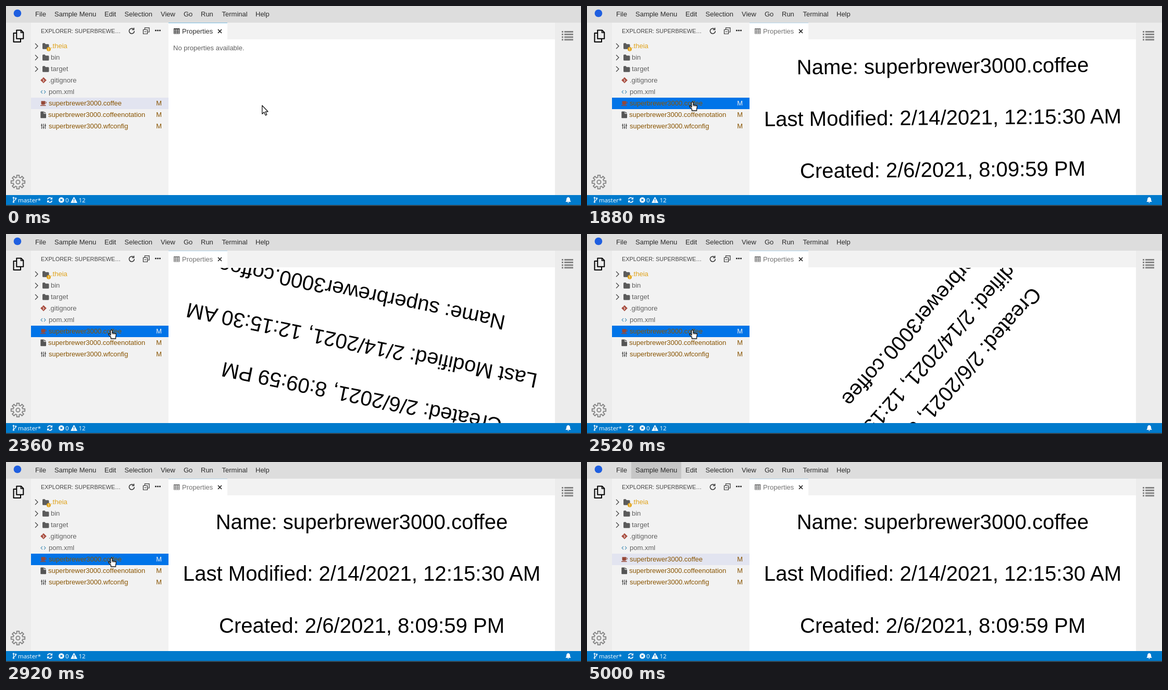
Write an HTML page that moves like this. It is 1104 px wide and 384 px high and loops after 5040 ms.

```html
<!DOCTYPE html>
<html lang="en">
<head>
<meta charset="utf-8">
<title>Property view</title>
<style>
  html, body { margin: 0; width: 100%; height: 100%; overflow: hidden; background: #fff; }
  svg { display: block; width: 100vw; height: 100vh; }
  text { font: 13px "Liberation Sans", Arial, sans-serif; fill: #616161; white-space: pre; }
  #menu text { fill: #2b2b2b; }
  #title { font-size: 10.85px; fill: #444; }
  #info text { font-size: 40.1px; fill: #000; text-anchor: middle; }
  #status text { font: 11.5px "Open Sans", "Noto Sans", sans-serif; fill: #fff; }
  .mod { fill: #895503; }
  .line { fill: none; stroke-linecap: butt; }
</style>
</head>
<body>
<svg viewBox="0 0 1104 384">
  <defs>
    <clipPath id="panel"><rect x="312" y="65" width="742" height="298"/></clipPath>
    <path id="folder" d="M0 1.5Q0 0 1.5 0H4.5L6 2H11Q12.5 2 12.5 3.5V10Q12.5 11.5 11 11.5H1.5Q0 11.5 0 10Z" fill="#5b5b5b"/>
    <path id="chevron" d="M0 0L5 5L0 10" class="line" stroke="#424242" stroke-width="1.3"/>
  </defs>

  <rect width="1104" height="384" fill="#fff"/>
  <rect width="1104" height="32" fill="#dddddd"/>
  <rect y="32" width="48" height="331" fill="#ececec"/>
  <rect x="48" y="32" width="264" height="331" fill="#f2f2f2"/>
  <rect x="312" y="32" width="742" height="32" fill="#f2f2f2"/>
  <rect x="1054" y="32" width="50" height="331" fill="#ececec"/>

  <rect id="hover" x="85" width="96" height="32" fill="#c6c6c6"/>
  <circle cx="22" cy="14" r="7.3" fill="#1f5fe0"/>
  <g id="menu"></g>

  <g class="line" stroke="#000" stroke-width="2" stroke-linejoin="round">
    <path d="M20.3 46.5H29L33.3 50.8V62.8H20.3Z"/>
    <path d="M28.6 46.5V51.3H33.3" stroke-width="1.6"/>
    <path d="M20 52H14.6V69H28V63"/>
  </g>
  <g class="line" stroke="#818181" stroke-width="1.8">
    <path id="gear"/>
    <circle cx="23" cy="338" r="3.6"/>
  </g>
  <path d="M1067 49.5H1070M1072 49.5H1089M1067 54.5H1070M1072 54.5H1089M1067 59.7H1070M1072 59.7H1089M1067 64.8H1070M1072 64.8H1089" class="line" stroke="#858585" stroke-width="3"/>

  <text id="title" x="67" y="52">EXPLORER: SUPERBREWE…</text>
  <g class="line" stroke="#333" stroke-width="1.5">
    <path d="M246.4 48A5 5 0 1 1 244.6 44.2"/>
    <path d="M245.6 41.8V45.6H241.8"/>
    <path d="M263.5 45.5H271.5V53.5H263.5ZM265.5 49.5H269.5" stroke-width="1.2"/>
    <path d="M266.5 45V41.8H275V50H272" stroke-width="1.2"/>
    <path d="M286 47H289M290 47H293M294 47H297" stroke-width="2.4"/>
  </g>

  <rect id="row" x="48" y="176" width="264" height="22"/>
  <g id="tree"></g>
  <use href="#chevron" x="56" y="72"/><use href="#chevron" x="56" y="94"/><use href="#chevron" x="56" y="116"/>
  <use href="#folder" x="70" y="71.3"/><use href="#folder" x="70" y="93.3"/><use href="#folder" x="70" y="115.3"/>
  <circle cx="82" cy="82.7" r="4" fill="#e2a41b"/>
  <path d="M82 80.2V83.2M82 84V85.2" stroke="#fff" stroke-width="1.1"/>
  <path d="M72 136.7L77.8 142.5L72 148.3L66.2 142.5Z" fill="#a74a3c"/>
  <path d="M70 139.5L74 143.5M71.8 141.5V146" class="line" stroke="#f2f2f2" stroke-width="1"/>
  <path d="M70 162L67 165L70 168M73 162L76 165L73 168" class="line" stroke="#5a9abc" stroke-width="1.2"/>
  <g fill="#954838">
    <path d="M67.5 182.5H75V187.5Q75 189.5 73 189.5H69.5Q67.5 189.5 67.5 187.5ZM66 190.3H76.5V191.7H66Z"/>
    <path d="M75 184H76Q77.2 184 77.2 185.5T76 187H75" class="line" stroke="#954838" stroke-width="1.2"/>
  </g>
  <path d="M67 202.5H72.5V207H77V214.5Q77 215.3 76 215.3H67.2Q66.3 215.3 66.3 214.5V203.2ZM73.5 202.5L77 206H73.5Z" fill="#555"/>
  <path d="M68.5 226V236M72 226V236M75.5 226V236M67 229H70M70.5 233H73.5M74 229.5H77" class="line" stroke="#555" stroke-width="1.3"/>

  <rect x="312" y="32" width="113" height="32" fill="#fff"/>
  <rect id="edge" x="312" y="32" width="113" height="1"/>
  <g id="tab">
    <text x="338" y="53" style="fill:inherit">Properties</text>
    <path d="M322 43H333.5V53.5H322ZM323.2 45.2V47.3H325.4V45.2ZM326.5 45.2V47.3H329V45.2ZM330.1 45.2V47.3H332.3V45.2ZM323.2 48.4V50H325.4V48.4ZM326.5 48.4V50H329V48.4ZM330.1 48.4V50H332.3V48.4ZM323.2 51V52.4H325.4V51ZM326.5 51V52.4H329V51ZM330.1 51V52.4H332.3V51Z" fill-rule="evenodd"/>
  </g>
  <path d="M407 45L414 52M414 45L407 52" class="line" stroke="#222" stroke-width="1.7"/>

  <text id="empty" x="321" y="85">No properties available.</text>
  <g id="info" clip-path="url(#panel)"></g>

  <g id="status">
    <rect y="363" width="1104" height="19" fill="#007acc"/>
    <rect y="382" width="1104" height="2" fill="#34424c"/>
    <g class="line" stroke="#fff" stroke-width="1.2">
      <path d="M14.5 369V375.5M18.7 370.5Q18.7 373 14.5 374"/>
      <circle cx="14.5" cy="368.3" r="1.1"/><circle cx="14.5" cy="376.3" r="1.1"/><circle cx="18.7" cy="369.5" r="1.1"/>
      <path d="M79.6 371.3A4.5 4.5 0 0 1 87.5 369.8M88.4 373.7A4.5 4.5 0 0 1 80.5 375.2" stroke-width="1.7"/>
    </g>
    <path d="M89 367V371.5H84.7ZM79 378V373.5H83.3Z" fill="#fff"/>
    <circle cx="106.3" cy="372.5" r="5.3" fill="#fff"/>
    <path d="M104.3 370.5L108.3 374.5M108.3 370.5L104.3 374.5" stroke="#007acc" stroke-width="1.5"/>
    <path d="M130.5 367L136.3 377.5H124.7Z" fill="#fff" stroke="#fff" stroke-linejoin="round"/>
    <path d="M130.5 370V374M130.5 375V376.5" stroke="#007acc" stroke-width="1.4"/>
    <path d="M1079.5 367Q1083 367.5 1083 371.5Q1083 374.5 1084.7 376H1074.3Q1076 374.5 1076 371.5Q1076 367.5 1079.5 367ZM1078 376.8H1081Q1080.7 378.2 1079.5 378.2T1078 376.8Z" fill="#fff"/>
    <text x="23" y="377">master*</text>
    <text x="114" y="377">0</text>
    <text x="139.5" y="377">12</text>
  </g>

  <g id="cursor" fill="#fff" stroke="#111" stroke-width="1.3" stroke-linejoin="round">
    <path id="arrow" d="M.8 1V17.2L4.6 13.8L7.2 19.8L9.8 18.7L7.2 12.8H12Z"/>
    <g id="hand">
      <path d="M4.8 10.5V2A1.6 1.6 0 0 1 8 2V6L14 7.2Q15.6 7.6 15.5 9.5L14.6 13.5V17H5.4V14L1 9.5Q.3 7.8 1.8 7.5Q3 7.5 4.8 10.5Z"/>
      <path d="M8 6V9M10.5 7V9.2M13 7.5V9.5" class="line" stroke-width=".7"/>
    </g>
  </g>
</svg>
<script>
const LOOP = 5040, STEP = 40, REFRESH = 1000 / 60;
const CLICK = 1760, FILL = 1880, SPIN = 1882, TURN = 1000, MENU = 3920, BLUR = 5000;
const $ = id => document.getElementById(id);

function addText(parent, x, y, str, cls) {
  const el = document.createElementNS("http://www.w3.org/2000/svg", "text");
  el.setAttribute("x", x);
  el.setAttribute("y", y);
  if (cls) el.setAttribute("class", cls);
  el.textContent = str;
  return parent.appendChild(el);
}

[["File", 56], ["Sample Menu", 93], ["Edit", 189], ["Selection", 227.5], ["View", 297],
 ["Go", 341], ["Run", 374], ["Terminal", 414.5], ["Help", 479]]
  .forEach(([label, x]) => addText($("menu"), x, 20, label));

const marks = [];
[[".theia", 86], ["bin", 86], ["target", 86], [".gitignore", 82], ["pom.xml", 82],
 ["superbrewer3000.coffee", 82], ["superbrewer3000.coffeenotation", 81], ["superbrewer3000.wfconfig", 82]]
  .forEach(([name, x], i) => {
    const y = 81 + 22 * i, mod = i > 4;
    const el = addText($("tree"), x, y, name, mod ? "mod" : "");
    if (i === 0) el.style.fill = "#dfa21c";
    if (mod) marks.push(addText($("tree"), 288.3, y, "M", "mod"));
  });

const lines = [["Name: superbrewer3000.coffee", 129], ["Last Modified: 2/14/2021, 12:15:30 AM", 228],
               ["Created: 2/6/2021, 8:09:59 PM", 328]]
  .map(([str, y]) => ({ el: addText($("info"), 683, y, str), mid: y - 14 }));

// Eight-toothed outline
let gear = "";
for (let i = 0; i < 8; i++) {
  [[-0.25, 9.3], [-0.17, 13.4], [0.17, 13.4], [0.25, 9.3]].forEach(([da, r]) => {
    const a = i * Math.PI / 4 + da;
    gear += (gear ? "L" : "M") + (23 + r * Math.cos(a)).toFixed(2) + " " + (338 + r * Math.sin(a)).toFixed(2);
  });
}
$("gear").setAttribute("d", gear + "Z");

// Pointer stops: time, x, y, shape
const stops = [
  [0, 491, 190, "arrow"], [520, 486, 189, "arrow"], [600, 466, 186, "arrow"],
  [680, 430, 182, "arrow"], [800, 388, 180, "arrow"], [920, 350, 181, "arrow"],
  [1040, 332, 182, "arrow"], [1120, 322, 182, "arrow"], [1160, 294, 184, "hand"],
  [1200, 273, 184, "hand"], [1240, 256, 184, "hand"], [1360, 236, 184, "hand"],
  [1480, 212, 184, "hand"], [1640, 196, 184, "hand"], [3680, 191, 172, "hand"],
  [3720, 180, 148, "hand"], [3760, 164, 112, "hand"], [3800, 147, 74, "hand"],
  [3840, 134, 40, "arrow"], [3920, 122, 12, "arrow"], [4000, 0, 0, "none"]
];

function show(id, on) { $(id).style.display = on ? "" : "none"; }

// The spin advances on 60 Hz refreshes, seen through 25 fps steps
function spinAngle(t) {
  const shown = Math.floor((t + 4) / REFRESH) * REFRESH;
  const turn = Math.min(1, Math.max(0, (shown - SPIN) / TURN));
  return -360 * (turn % 1);
}

function draw(t) {
  const focused = t >= CLICK && t < BLUR, clicked = t >= CLICK, filled = t >= FILL;
  const [, x, y, shape] = stops.findLast(s => s[0] <= t);
  show("arrow", shape === "arrow");
  show("hand", shape === "hand");
  $("cursor").setAttribute("transform", `translate(${x} ${y})`);

  $("row").setAttribute("fill", focused ? "#0074e8" : "#e2e4f0");
  marks[0].style.fill = focused ? "#f0f0f0" : "";
  $("tab").setAttribute("fill", clicked ? "#747474" : "#333");
  $("edge").setAttribute("fill", clicked ? "#b5d7ee" : "#78bde4");
  show("hover", t >= MENU);
  show("empty", !filled);
  show("info", filled);

  const angle = spinAngle(t);
  lines.forEach(l => l.el.setAttribute("transform", `rotate(${angle} 683 ${l.mid})`));
}

function tick() {
  draw(Math.floor((performance.now() % LOOP + 0.5) / STEP) * STEP % LOOP);
  requestAnimationFrame(tick);
}
tick();
</script>
</body>
</html>
```
